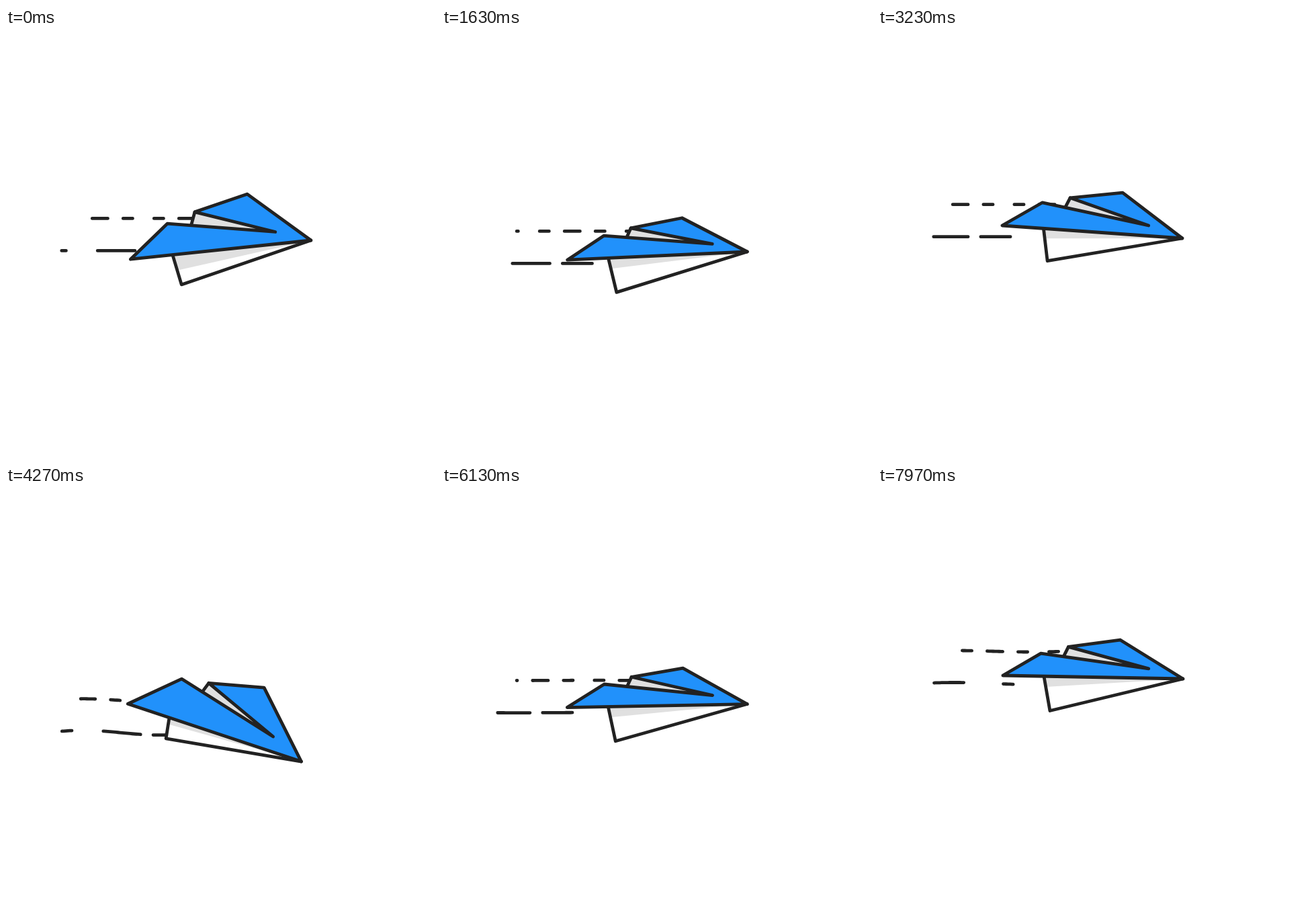
Recreate the animation shown at these times as an HTML page with a canvas. Size 640 by 640 pixels, loop 8 s.

```html
<!DOCTYPE html>
<html lang="en">
<head>
<meta charset="utf-8">
<title>Paper plane</title>
<style>
html, body { margin: 0; width: 100%; height: 100%; overflow: hidden; background: #fff; }
canvas { display: block; width: 100vmin; height: 100vmin; }
</style>
</head>
<body>
<canvas id="stage" width="640" height="640"></canvas>
<script>
const ctx = document.getElementById('stage').getContext('2d');
const LOOP = 8000, INK = '#222', BLUE = '#2191fb', SHADE = '#e0e0e0';

// Key poses: time, nose height, pitch in degrees, trail bend
const poses = [
  [0, 316, -6, 0],
  [1630, 333, -2.6, 0],
  [3230, 313, 4.05, 0],
  [4270, 410, 18.4, 3.5],
  [5030, 455, 18, -2],
  [5430, 435, 12.3, -4.5],
  [5900, 361, 2.9, -2],
  [6870, 238, -9.9, 4.8],
  [7970, 287, 1.07, 1.5]
];

const trails = [
  { left: 111.2, right: 281, y: 0, start: 126, speed: .1252, sway: .7,
    dash: [23.2, 22.8, 14.2, 31.8, 14.2, 22.8] },
  { left: 82.8, right: 248, y: 48, start: 134, speed: .1659, sway: 1,
    dash: [55.7, 18.8, 44.2, 58.8, 14.7, 46.8] }
];

function ease(x) {
  const u = Math.min(1, Math.max(0, x));
  return u * u * (3 - 2 * u);
}

// Smooth course of one pose column, without overshoot
function pose(col, t) {
  const last = poses.length - 1;
  const slope = j => (poses[j + 1][col] - poses[j][col]) / (poses[j + 1][0] - poses[j][0]);
  const tangent = j => {
    if (j === 0) return slope(0) / 2;
    if (j === last) return slope(last - 1) / 2;
    const a = slope(j - 1), b = slope(j);
    return a * b <= 0 ? 0 : 2 * a * b / (a + b);
  };
  if (t >= poses[last][0]) return poses[last][col];
  const i = poses.findIndex(p => p[0] > t) - 1;
  const h = poses[i + 1][0] - poses[i][0], u = (t - poses[i][0]) / h, v = 1 - u;
  const from = poses[i][col], to = poses[i + 1][col];
  return from + (to - from) * ease(u) + h * u * v * (tangent(i) * v - tangent(i + 1) * u);
}

function trace(points, closed) {
  ctx.beginPath();
  points.forEach(p => ctx.lineTo(p[0], p[1]));
  if (closed) ctx.closePath();
}

function fill(points, color) {
  trace(points, true);
  ctx.fillStyle = color;
  ctx.fill();
}

function drawTrail(trail, base, bend, t) {
  const points = [];
  for (let x = trail.left; x <= trail.right; x += 3) {
    const wave = Math.cos((x - 115) * Math.PI / 112);
    points.push([x, base + trail.y - bend * trail.sway * wave]);
  }
  ctx.setLineDash(trail.dash);
  ctx.lineDashOffset = trail.left - trail.start - ctx.lineWidth / 2 + trail.speed * t;
  trace(points);
  ctx.stroke();
  ctx.setLineDash([]);
}

function draw(t) {
  const y = pose(1, t), deg = pose(2, t), bend = pose(3, t);
  const rad = Math.PI / 180, s = Math.sin(deg * rad), c = Math.cos(deg * rad);
  const x = 454.3 - 230 * (1 - Math.cos((deg + 2.3) * rad));
  const at = (dx, dy) => [x + dx * c - dy * s, y + dx * s + dy * c];

  // Diving rolls the plane; it also starts out banked and levels off.
  const roll = ease(deg / 15), bank = 1 - ease(t / 1630);
  const far = roll + bank, near = roll + bank * .5, low = roll + bank * .3;

  ctx.fillStyle = '#fff';
  ctx.fillRect(0, 0, 640, 640);
  ctx.strokeStyle = INK;
  ctx.lineWidth = 4.8;
  ctx.lineCap = ctx.lineJoin = 'round';

  const base = y - 170 * s - 38.3 - 12 * bank + bend * .3;
  trails.forEach(trail => drawTrail(trail, base, bend, t));

  const nose = at(0, 0);
  const tail = at(-268 - 4 * near, 0);
  const wing = at(-212.2 + 4.4 * near, -33.5 - 27 * near);
  const inner = at(-51.4, -14 - 8 * near);
  const fold = at(-171.4 + 3.9 * far, -43.8 - .3 * deg - 18 * far);
  const top = at(-94.7 + 7.5 * far, -55.5 - .35 * deg - 25 * far);
  const keel = at(-197 - 4.8 * low, 51.5 - 20.3 * low);
  const hinge = at(-207, 0);
  const back = at(-183, -20);
  const depth = .31 + .21 * bank;
  const shade = hinge.map((v, i) => v + (keel[i] - v) * depth);

  fill([hinge, keel, nose], '#fff');
  fill([hinge, shade, nose], SHADE);
  trace([hinge, keel, nose]);
  ctx.stroke();

  fill([fold, inner, back], SHADE);
  trace([fold, back]);
  ctx.stroke();

  fill([fold, top, nose, tail, wing, inner], BLUE);
  ctx.stroke();
}

function frame(now) {
  draw(now % LOOP);
  requestAnimationFrame(frame);
}
draw(0);
requestAnimationFrame(frame);
</script>
</body>
</html>
```
